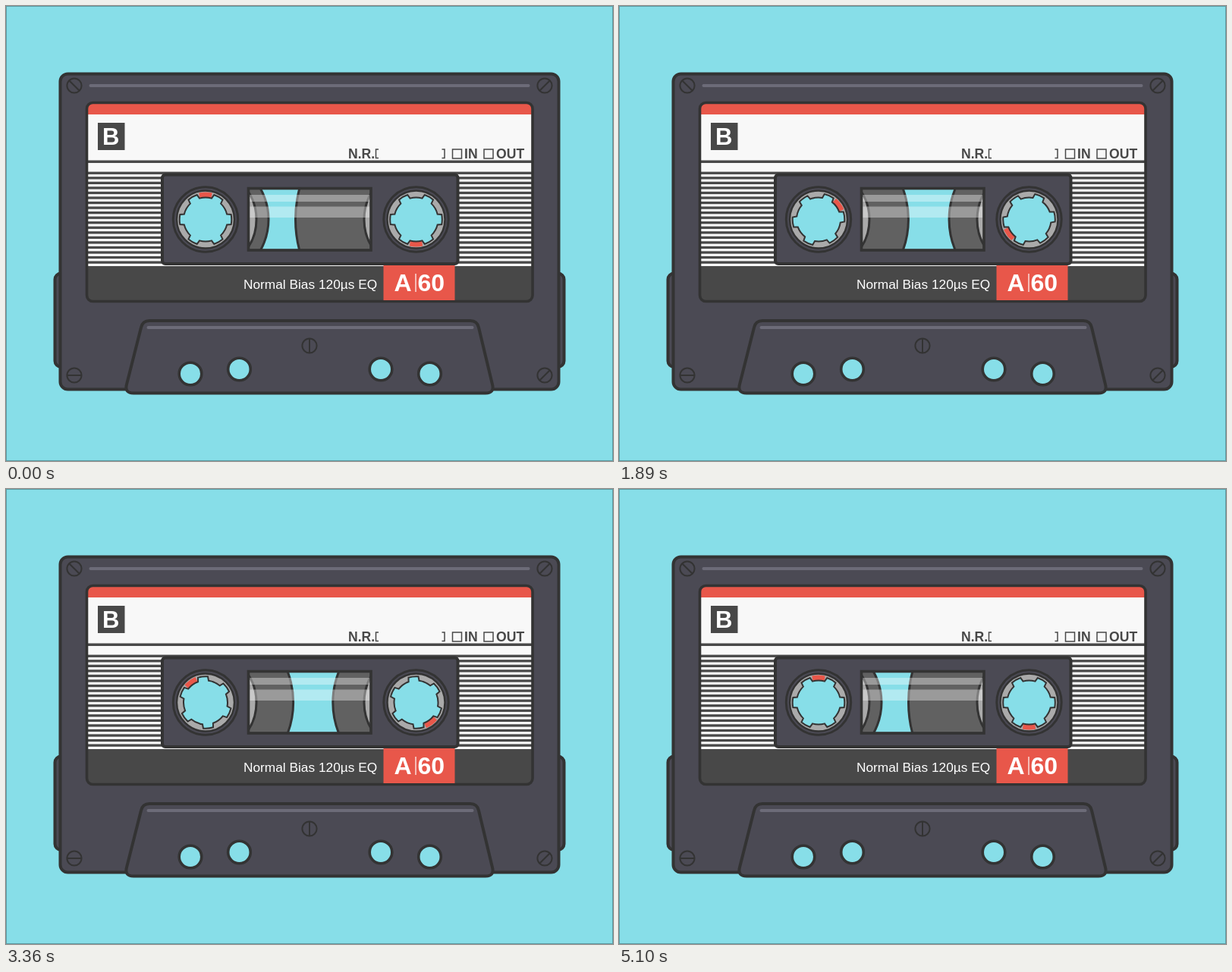
An HTML page for the animation above (5400 ms loop, 800 by 600 pixels).

```html
<!DOCTYPE html>
<html lang="en">
<head>
<meta charset="utf-8">
<title>Cassette</title>
<style>
  html, body { margin: 0; width: 100%; height: 100%; overflow: hidden; background: #87dee8; }
  svg { display: block; width: 800px; height: 600px; font-family: "Liberation Sans", Arial, sans-serif; }
  .body { fill: #4b4a54; stroke: #333; stroke-width: 4; }
  .line { fill: none; stroke: #333; stroke-width: 2; }
  .shine { fill: none; stroke: #6c6b78; stroke-width: 4; stroke-linecap: round; }
  .hole { fill: #87dee8; stroke: #333; stroke-width: 3.6; }
  .tape { fill: #616161; stroke: #333; stroke-width: 3; }
  .core { fill: #aaa; stroke: #333; stroke-width: 3; }
  .mark { fill: none; stroke: #484848; stroke-width: 1.5; }
  .small { font-size: 17.6px; font-weight: bold; fill: #484848; }
  .bold { font-weight: bold; fill: #fff; }
  .red { fill: #e8574a; }
  .dark { fill: #484848; }
</style>
</head>
<body>
<svg viewBox="0 0 800 600">
  <defs>
    <clipPath id="label"><rect x="107" y="128" width="587" height="261" rx="7"/></clipPath>
    <clipPath id="window"><rect x="320" y="241" width="161" height="81"/></clipPath>
  </defs>
  <rect width="800" height="600" fill="#87dee8"/>
  <rect x=".5" y=".5" width="799" height="599" fill="none" stroke="#5b9ba3"/>

  <!-- shell -->
  <rect class="body" x="64.5" y="352.5" width="671" height="123.5" rx="8"/>
  <rect class="body" x="71.5" y="89.5" width="657" height="416" rx="10"/>
  <path class="shine" d="M111.500 105H688.500"/>

  <!-- label -->
  <g clip-path="url(#label)">
    <rect x="106" y="126" width="590" height="264" fill="#f8f8f8"/>
    <rect class="red" x="106" y="126" width="590" height="17"/>
    <path d="M106 205.300H696" stroke="#484848" stroke-width="3.400"/>
    <g id="stripes" class="dark"></g>
    <rect class="dark" x="106" y="343" width="590" height="47"/>
  </g>
  <rect x="106.500" y="127.500" width="587.500" height="262" rx="8" class="line" style="stroke-width:3.6"/>
  <rect class="dark" x="121" y="154" width="35.500" height="36"/>
  <text class="bold" x="138.300" y="183" font-size="31" text-anchor="middle">B</text>
  <text class="small" x="451" y="201">N.R.</text>
  <text class="small" x="604" y="201">IN</text>
  <text class="small" x="646" y="201">OUT</text>
  <path class="mark" d="M491 189h-3.500v11.500h3.500M574.500 189h3.500v11.500h-3.500M588.500 189h12v12h-12zM630 189h12v12h-12z"/>
  <text x="313" y="373" font-size="17.3" fill="#fff">Normal Bias 120µs EQ</text>
  <rect class="red" x="497.500" y="341.500" width="94" height="46.500"/>
  <text class="bold" x="511.500" y="376" font-size="32">A</text>
  <path d="M540 353V377" stroke="#fff" stroke-width="1.2"/>
  <text class="bold" x="542.500" y="376" font-size="32">60</text>

  <!-- centre panel and window -->
  <rect class="body" x="206" y="222.500" width="389.500" height="117.500" rx="4"/>
  <g clip-path="url(#window)">
    <rect x="318" y="239" width="164" height="84" fill="#87dee8"/>
    <circle id="tapeL" class="tape" cx="263" cy="281.500"/>
    <circle id="tapeR" class="tape" cx="540.500" cy="281.500"/>
    <circle class="core" cx="263" cy="281.500" r="67"/>
    <circle class="core" cx="540.500" cy="281.500" r="68.500"/>
    <path d="M318 249H482V258H318zM318 264.500H482V279H318z" fill="#fff" opacity=".36"/>
  </g>
  <rect x="319.500" y="240.500" width="161.500" height="81.500" class="line" style="stroke-width:3.6"/>
  <g id="reels"></g>

  <!-- head cover -->
  <path class="body" d="M168 510.500Q156 510.500 159 499L178 424Q180 415 189 415H612Q621 415 623 424L641 499Q644 510.500 632 510.500Z"/>
  <path class="shine" d="M187.500 424H614.500"/>
  <g id="holes"></g>
  <g id="screws"></g>
</svg>
<script>
const $ = id => document.getElementById(id);

// Evenly ruled band between the title lines and the footer
const rows = 19, pitch = (343 - 218.6) / rows;
for (let i = 0; i < rows; i++) {
  $('stripes').innerHTML += `<rect x="106" y="${218.6 + i * pitch}" width="590" height="3.3"/>`;
}

$('holes').innerHTML = [[243, 485], [307.5, 479], [494, 479], [558.5, 485]]
  .map(([x, y]) => `<circle class="hole" cx="${x}" cy="${y}" r="14.8"/>`).join('');

$('screws').innerHTML = [[90, 105, 45], [710, 105, -45], [90, 487, 0], [710, 487, -45], [400, 448, 90]]
  .map(([x, y, a]) => `<g class="line" transform="translate(${x} ${y}) rotate(${a})">
    <circle r="9.6"/><path d="M-9.600 0H9.600"/></g>`).join('');

const polar = (r, deg) => {
  const a = deg * Math.PI / 180;
  return `${(r * Math.cos(a)).toFixed(2)} ${(r * Math.sin(a)).toFixed(2)}`;
};

// Spindle opening with six teeth
const base = 29, tip = 34.3;
let gear = '';
for (let a = 0; a < 360; a += 60) {
  gear += `${a ? 'L' : 'M'}${polar(base, a - 14)}L${polar(tip, a - 11)}` +
    `A${tip} ${tip} 0 0 1 ${polar(tip, a + 11)}L${polar(base, a + 14)}` +
    `A${base} ${base} 0 0 1 ${polar(base, a + 46)}`;
}
const flag = `M${polar(28, -105)}L${polar(36, -104)}A36 36 0 0 1 ${polar(36, -76)}L${polar(28, -75)}Z`;

$('reels').innerHTML = [263, 540.5].map(x => `<g transform="translate(${x} 281.500)">
  <circle class="body" r="42.7" style="stroke-width:3"/>
  <circle r="38" fill="#aaa" stroke="#333" stroke-width="2.4"/>
  <g class="spin"><path class="red" d="${flag}"/>
  <path class="hole" d="${gear}Z" style="stroke-width:2"/></g></g>`).join('');

const spins = document.querySelectorAll('.spin');
const STEP = 30, RUN = 2400, HALF = 2700;

function draw(now) {
  const t = Math.floor(now % (2 * HALF) / STEP) * STEP;
  const run = Math.min(t % HALF, RUN) / RUN;
  const p = t < HALF ? run : 1 - run;
  $('tapeL').setAttribute('r', 83 + 45 * p);
  $('tapeR').setAttribute('r', 159 - 68 * p);
  spins.forEach((s, i) => s.setAttribute('transform', `rotate(${p * 1440 + i * 180})`));
}

const start = performance.now();
function tick() {
  draw(performance.now() - start);
  requestAnimationFrame(tick);
}
tick();
</script>
</body>
</html>
```
